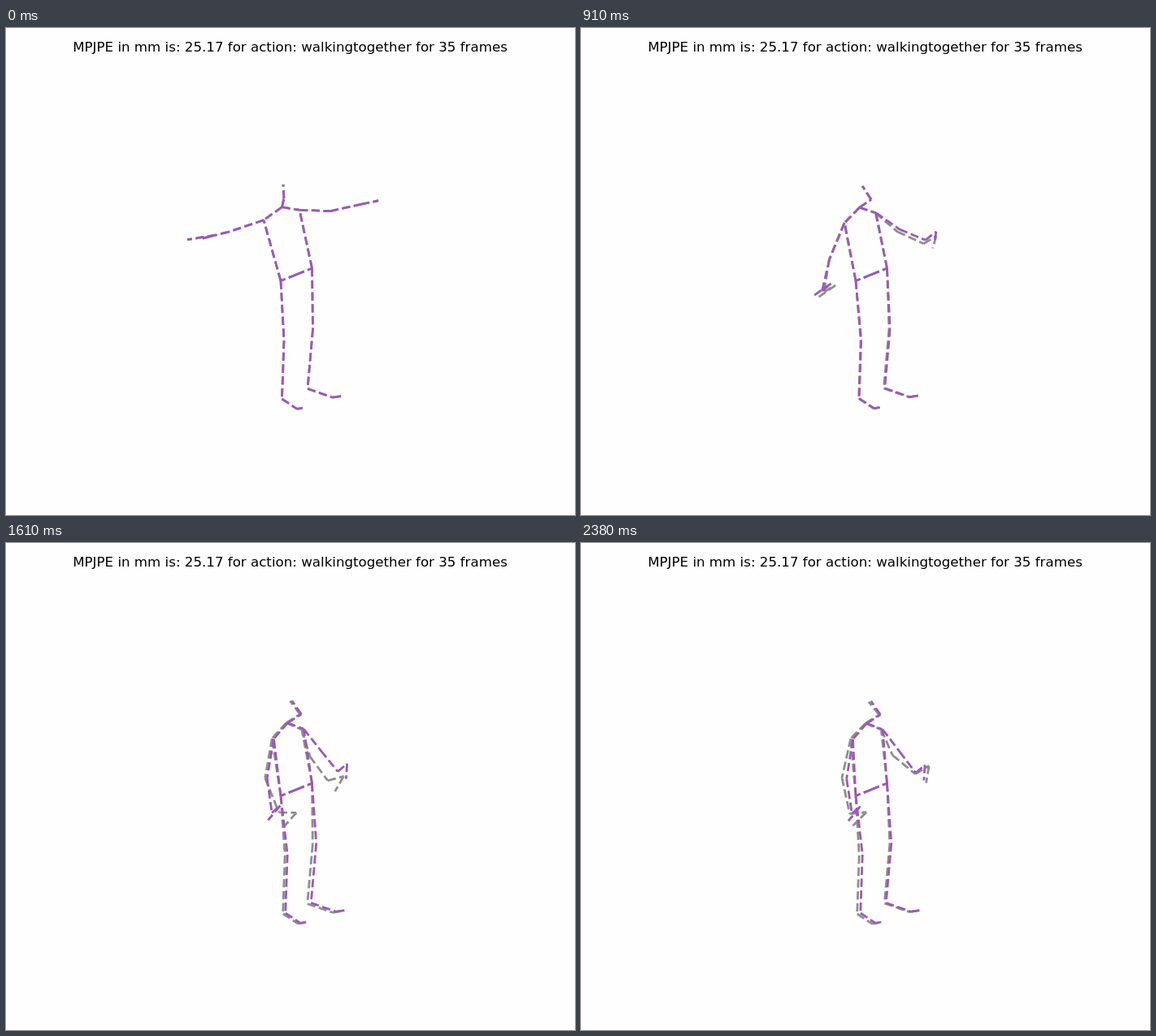
An HTML page with a canvas for the animation above (2450 ms loop, 700x600 px).

```html
<!DOCTYPE html>
<html lang="en">
<head>
<meta charset="utf-8">
<title>Walking pose prediction</title>
<style>
  html, body { margin: 0; width: 100%; height: 100%; overflow: hidden; background: #fefefe; }
  canvas { display: block; }
</style>
</head>
<body>
<canvas id="stage" width="700" height="600"></canvas>
<script>
const ctx = document.getElementById("stage").getContext("2d");
const STEP_MS = 70, STEP_COUNT = 35;
const ROOT = [357.25, 303.75];

// Bones turn (degrees) and stretch (pixels) from a first to a last value, centred on step `mid`.
// The observed figure adds a passing `swing`, a lasting `settle` and some `grow` in length.
const HEAD = [
  { turn: [-77, -32], length: [10.8, 20], mid: 3.5 },
  { turn: [-93, -125], length: [17.5, 20.5], mid: 3.5, settle: -4 }
];
const SIDES = [
  {
    hip: [338, 311.5],
    leg: [[342, 385], [339.5, 457], [358, 469.3], [365, 468]],
    lag: { swing: 0.4, settle: 0.9 },
    arm: [
      { turn: [144.6, 131], length: [27.6, 26], mid: 9.3, settle: 3 },
      { turn: [161.4, 99], length: [45.4, 49.5], mid: 9, swing: -1, settle: 4 },
      { turn: [166, 81], length: [33, 43], mid: 9.7, swing: -14, grow: 2 },
      { turn: [-14, -41], length: [16.5, 13.5], mid: 4, swing: 32, settle: 30, grow: 6 },
      { turn: [171, 129], length: [35.4, 23.3], mid: 11.5, settle: 6 }
    ]
  },
  {
    hip: [376.5, 296],
    leg: [[377.5, 371], [371, 444.4], [402, 455.2], [415.2, 453]],
    lag: { swing: 0.95, settle: 0.25 },
    arm: [
      { turn: [9, 21], length: [21.8, 21], mid: 9.3, swing: 3 },
      { turn: [2.3, 52.6], length: [38, 34.5], mid: 11, swing: 18, settle: 10 },
      { turn: [-12.6, 53], length: [39, 32.7], mid: 12.5, swing: 8, settle: -16, grow: 3 },
      { turn: [-12, -41], length: [21.5, 15], mid: 5, swing: 24, settle: 5, grow: 4 },
      { turn: [164, 94], length: [5, 19], mid: 4, swing: 26, grow: 2 }
    ]
  }
];

const mix = ([a, b], u) => a + (b - a) * u;
const logistic = x => 1 / (1 + Math.exp(-x / 3));

// S-curve that is 0 at step 0, steepest at `mid` and then levels out at 1.
function ease(step, mid) {
  const first = logistic(-mid);
  return (logistic(step - mid) - first) / (1 - first);
}

// How far the figure departs from the prediction at this step.
const deviation = (step, isObserved) => isObserved
  ? { swing: Math.exp(-(((step - 23) / 9) ** 2)), settle: ease(step, 25) }
  : { swing: 0, settle: 0 };

const weigh = ({ swing = 0, settle = 0 }, dev) => swing * dev.swing + settle * dev.settle;

function chainFrom(origin, bones, step, dev) {
  const joints = [origin];
  let [x, y] = origin;
  for (const bone of bones) {
    const angle = (mix(bone.turn, ease(step, bone.mid)) + weigh(bone, dev)) * Math.PI / 180;
    const length = mix(bone.length, ease(step, 10)) + (bone.grow || 0) * (dev.swing + dev.settle);
    x += length * Math.cos(angle);
    y += length * Math.sin(angle);
    joints.push([x, y]);
  }
  return joints;
}

function drawFigure(color, step, isObserved) {
  const dev = deviation(step, isObserved);
  const drift = (step / (STEP_COUNT - 1)) ** 1.35;
  const neck = [339.5 + 12 * drift - 1.4 * (dev.swing + dev.settle), 220.7 + 1.5 * drift];
  const chains = [chainFrom(neck, HEAD, step, dev)];
  for (const { hip, leg, lag, arm } of SIDES) {
    const sway = ease(step, 11.3) - weigh(lag, dev);
    const armJoints = chainFrom(neck, arm, step, dev);
    chains.push(
      armJoints,
      [hip, armJoints[1]],
      [ROOT, hip, ...leg.map(([x, y]) => [x + 4.3 * sway, y - sway])]
    );
  }
  ctx.strokeStyle = color;
  ctx.beginPath();
  for (const chain of chains) {
    // Every bone is its own subpath, so its dashes start afresh.
    for (let i = 1; i < chain.length; i++) {
      ctx.moveTo(...chain[i - 1]);
      ctx.lineTo(...chain[i]);
    }
  }
  ctx.stroke();
}

function render(now) {
  const step = Math.floor(now / STEP_MS) % STEP_COUNT;
  ctx.fillStyle = "#fefefe";
  ctx.fillRect(0, 0, 700, 600);
  ctx.fillStyle = "#000";
  ctx.font = "16.667px 'DejaVu Sans', sans-serif";
  ctx.textAlign = "center";
  ctx.fillText("MPJPE in mm is: 25.17 for action: walkingtogether for 35 frames", 349.5, 29);
  ctx.lineWidth = 2.78;
  ctx.setLineDash([10.28, 4.44]);
  drawFigure("#8e8e8e", step, true);
  drawFigure("#9b59b6", step, false);
}

const start = performance.now();
function tick() {
  render(performance.now() - start);
  requestAnimationFrame(tick);
}
tick();
</script>
</body>
</html>
```
